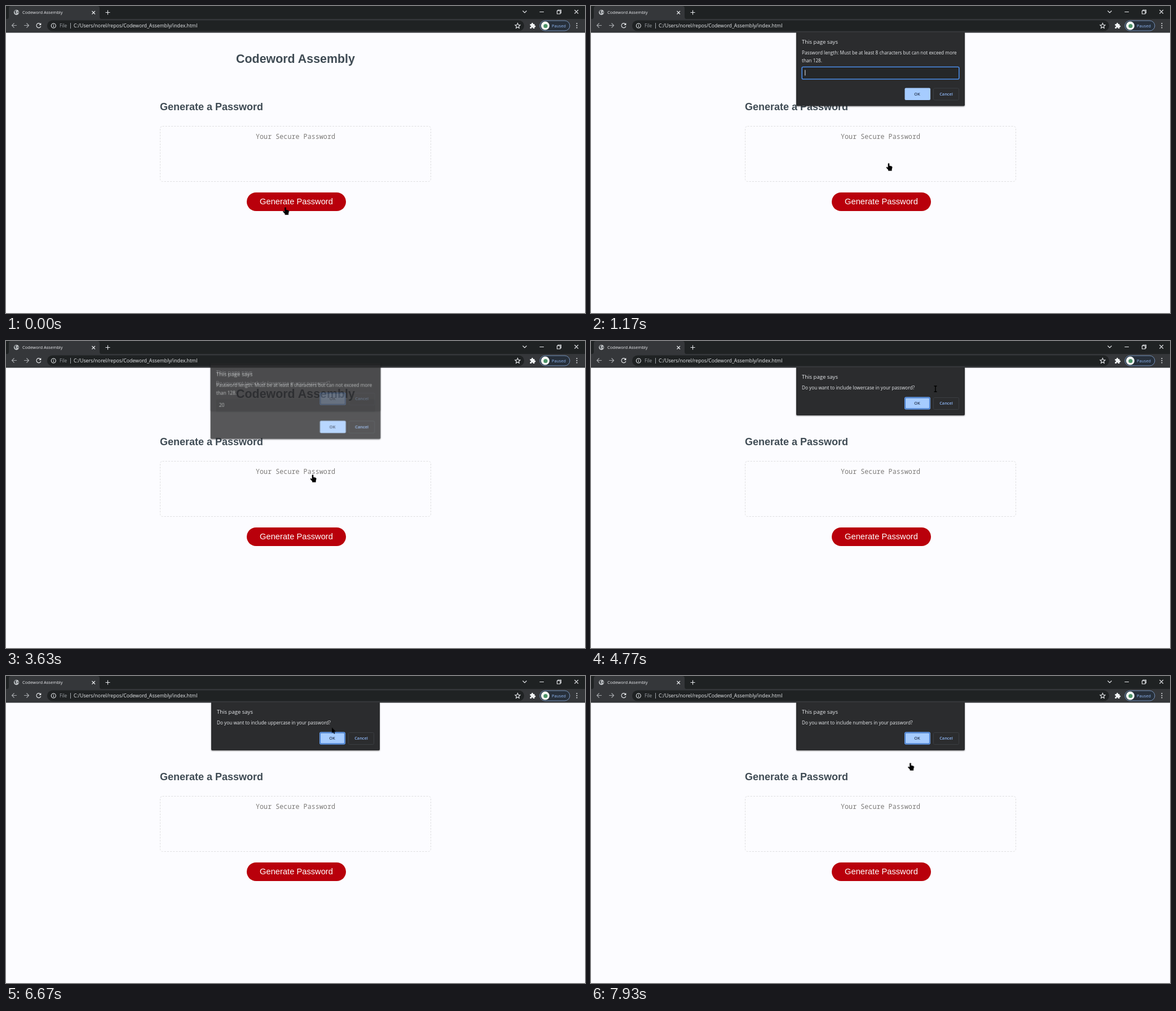
Write an HTML page that moves like this. It is 1027 px wide and 545 px high and loops after 8 s.

```html
<!DOCTYPE html>
<html lang="en">
<head>
<meta charset="utf-8">
<title>Codeword Assembly</title>
<style>
  html, body { margin: 0; width: 100%; height: 100%; overflow: hidden; background: #fcfcff; }
  svg { display: block; width: 100%; height: 100%; }
  text { white-space: pre; }
  .ui { font-family: "Open Sans", "Noto Sans", sans-serif; font-size: 8.22px; fill: #e8eaed; }
  .page { font-family: "Liberation Sans", Arial, sans-serif; font-weight: 700; fill: #3f4b54; }
  .mono { font-family: "Noto Sans Mono", "DejaVu Sans Mono", monospace; font-size: 11.75px; fill: #7d7b79; }
  .mid { text-anchor: middle; }
  .line { fill: none; stroke: #e8eaed; stroke-width: 1.1; }
  .head { font-size: 9.54px; }
  .label { font-size: 7.4px; font-weight: 600; text-anchor: middle; }

  .dialog, .cursor, .cursor g, .caret, .digit, .ring { animation: 8s linear infinite; }
  .dialog { transform-box: fill-box; transform-origin: center; opacity: 0; filter: drop-shadow(0 1px 1px rgba(0,0,0,.45)); }
  .length { animation-name: length; }
  .lower { animation-name: lower; }
  .upper { animation-name: upper; }
  .number { animation-name: number; }

  /* Each dialog drops into place in 250 ms and lifts away in 150 ms. */
  @keyframes length {
    0%, 7.5% { opacity: 0; transform: translateY(-10px) scale(1.012); }
    9% { opacity: 1; }
    9.06% { transform: translateY(-2.6px) scale(1.005); }
    10.625% { transform: none; }
    45% { opacity: 1; transform: none; }
    45.56% { transform: translateY(-6px) scale(1.012); }
    46.875%, 100% { opacity: 0; transform: translateY(-11px) scale(1.02); }
  }
  @keyframes lower {
    0%, 45% { opacity: 0; transform: translateY(-10px) scale(1.012); }
    46.5% { opacity: 1; }
    46.56% { transform: translateY(-2.6px) scale(1.005); }
    48.125% { transform: none; }
    66.25% { opacity: 1; transform: none; }
    66.81% { transform: translateY(-6px) scale(1.012); }
    68.125%, 100% { opacity: 0; transform: translateY(-11px) scale(1.02); }
  }
  @keyframes upper {
    0%, 66.25% { opacity: 0; transform: translateY(-10px) scale(1.012); }
    67.75% { opacity: 1; }
    67.81% { transform: translateY(-2.6px) scale(1.005); }
    69.375% { transform: none; }
    87.5% { opacity: 1; transform: none; }
    88.06% { transform: translateY(-6px) scale(1.012); }
    89.375%, 100% { opacity: 0; transform: translateY(-11px) scale(1.02); }
  }
  @keyframes number {
    0%, 87.5% { opacity: 0; transform: translateY(-10px) scale(1.012); }
    89% { opacity: 1; }
    89.06% { transform: translateY(-2.6px) scale(1.005); }
    90.625%, 100% { opacity: 1; transform: none; }
  }

  .ring { animation-name: ring; animation-timing-function: step-end; }
  @keyframes ring { 0% { opacity: 1; } 45%, 100% { opacity: 0; } }

  .caret { animation-name: caret; animation-timing-function: step-end; }
  @keyframes caret {
    0% { opacity: 1; transform: none; }
    20% { opacity: 0; }
    26.7% { opacity: 1; }
    33.375% { opacity: 0; }
    37.6% { opacity: 1; transform: translateX(4.7px); }
    39.2% { transform: translateX(9.4px); }
    45%, 100% { opacity: 0; transform: translateX(9.4px); }
  }

  .digit { animation-name: first; animation-timing-function: step-end; }
  .digit + .digit { animation-name: second; }
  @keyframes first { 0% { opacity: 0; } 37.6%, 100% { opacity: 1; } }
  @keyframes second { 0% { opacity: 0; } 39.2%, 100% { opacity: 1; } }

  .cursor { animation-name: move; }
  @keyframes move {
    0%, .4% { transform: translate(495.5px, 357px); }
    5.5%, 10.9% { transform: translate(502.5px, 345px); animation-timing-function: ease-in-out; }
    17.5%, 47% { transform: translate(544px, 237px); animation-timing-function: ease-in-out; }
    55%, 55.9% { transform: translate(620px, 120px); }
    59.5%, 61% { transform: translate(611px, 85px); }
    65%, 70.6% { transform: translate(580px, 108px); }
    76.25%, 78.7% { transform: translate(568px, 154px); }
    83.3% { transform: translate(578px, 91px); }
    86.6%, 97.5% { transform: translate(580px, 106px); }
    99.1%, 100% { transform: translate(566.5px, 154px); }
  }

  .cursor g { opacity: 0; animation-timing-function: step-end; }
  .cursor .hand { animation-name: hand; }
  .cursor .beam { animation-name: beam; }
  .cursor .arrow { animation-name: arrow; }
  @keyframes hand {
    0% { opacity: 1; } 54% { opacity: 0; }
    73.5% { opacity: 1; } 80.4% { opacity: 0; }
    98.4%, 100% { opacity: 1; }
  }
  @keyframes beam { 0% { opacity: 0; } 59% { opacity: 1; } 62%, 100% { opacity: 0; } }
  @keyframes arrow {
    0% { opacity: 0; } 54% { opacity: 1; } 59% { opacity: 0; }
    62% { opacity: 1; } 73.5% { opacity: 0; }
    80.4% { opacity: 1; } 98.4%, 100% { opacity: 0; }
  }
</style>
</head>
<body>
<svg viewBox="0 0 1027 545">
  <defs>
    <g id="cancel">
      <rect x="607.5" y="100.5" width="45" height="21" rx="2" fill="none" stroke="#3b3e42"/>
      <text class="ui label" x="630" y="113" style="fill:#8fb8f8">Cancel</text>
    </g>
    <g id="confirm">
      <path d="M364 47H663V130Q663 132 661 132H366Q364 132 364 130Z" fill="#2b2c2e"/>
      <text class="ui head" x="374" y="67">This page says</text>
      <rect x="556" y="99.5" width="46" height="22" rx="2.5" fill="#2d64b4"/>
      <rect x="556.5" y="100" width="45" height="21" rx="2" fill="none" stroke="#7db0fa"/>
      <rect x="558" y="101.5" width="42" height="18" rx="1" fill="#a6ccff"/>
      <text class="ui label" x="578.5" y="113" style="fill:#26344d">OK</text>
      <use href="#cancel"/>
    </g>
  </defs>

  <!-- page -->
  <rect width="1027" height="545" fill="#fcfcff"/>
  <text class="page mid" x="513.5" y="101" font-size="21.4">Codeword Assembly</text>
  <text class="page" x="273" y="185.3" font-size="18">Generate a Password</text>
  <rect x="273.5" y="213.5" width="480" height="98" rx="4" fill="none" stroke="#dedee0" stroke-dasharray="3 2.2"/>
  <text class="mono mid" x="513.5" y="235.6">Your Secure Password</text>
  <rect x="427" y="331" width="176" height="33" rx="16.5" fill="#b9000b"/>
  <text class="page mid" x="515" y="352.3" font-size="14.7" style="font-weight:400;fill:#fff">Generate Password</text>

  <!-- browser frame -->
  <rect width="1027" height="24" fill="#1f2223"/>
  <rect y="23" width="1027" height="24.5" fill="#35373a"/>
  <path d="M1 23.5Q5 23 5 19V4Q5 0 9 0H162Q166 0 166 4V19Q166 23 170 23.5Z" fill="#35373a"/>
  <circle cx="18.5" cy="11.3" r="4.6" fill="#c6c9cc"/>
  <path d="M15 9Q17 7 19 8L17.5 10.5 19 12 17.5 14.5 15.5 12ZM20 10L22.5 9.5 22 13 20.5 13Z" fill="#54585c"/>
  <text class="ui" x="29" y="14" style="font-size:7.55px">Codeword Assembly</text>
  <path class="line" d="M152.5 9L158 14.5M158 9L152.5 14.5M176.5 11.5H184.5M180.5 7.5V15.5"/>
  <path class="line" stroke-width="1" d="M916.5 8.5L920 12 923.5 8.5M946.5 10.5H954M977.5 8.5H983V14H977.5ZM979 8V7H984.5V12.5H983.5M1008.5 7L1015 13.5M1015 7L1008.5 13.5"/>
  <path class="line" style="stroke:#a6a9ad" d="M19 34.5H10.5M14.5 30.5L10.5 34.5 14.5 38.5M32 34.5H40.5M36.500 30.5L40.5 34.5 36.5 38.5"/>
  <path class="line" stroke-width="1.4" d="M61.3 32.3A4 4 0 1 0 61.8 36"/>
  <path d="M62.300 30V34H58.300Z" fill="#e8eaed"/>
  <rect x="73" y="25.500" width="846" height="19" rx="9.500" fill="#1f2223"/>
  <circle class="line" cx="84.300" cy="35" r="4" stroke-width="1"/>
  <path class="line" d="M84.300 34.500V37.300M84.300 32.500V33.500"/>
  <text class="ui" x="95" y="38" style="fill:#a0a5aa">File</text>
  <path d="M114.500 30V40" stroke="#a0a5aa"/>
  <text class="ui" x="120" y="38" style="font-size:8.75px">C:/Users/norel/repos/Codeword_Assembly/index.html</text>
  <path class="line" stroke-width="1" d="M907.500 30.500L908.800 33.600 912 33.900 909.600 36 910.300 39.300 907.500 37.500 904.700 39.300 905.400 36 903 33.900 906.200 33.600Z"/>
  <path d="M929.500 32H932Q932 29.800 933.500 29.800 935 29.800 935 32H937.500V34.500Q939.500 34.500 939.500 36 939.500 37.500 937.500 37.500V40H934.800Q934.800 38 933.400 38 932 38 932 40H929.500V37.200Q931.300 37.200 931.300 36 931.300 34.700 929.500 34.700Z" fill="#f1f3f4"/>
  <rect x="947" y="26" width="53" height="18" rx="9" fill="#27303b" stroke="#7592ba"/>
  <circle cx="956.500" cy="35" r="7.500" fill="#f4f8f5"/>
  <circle cx="957" cy="35.500" r="3.600" fill="#4c9468"/>
  <text class="ui" x="968" y="37.500" style="font-size:7.3px;fill:#8fb6f2">Paused</text>
  <g fill="#e8eaed"><circle cx="1012.500" cy="31" r="1"/><circle cx="1012.500" cy="34.700" r="1"/><circle cx="1012.500" cy="38.400" r="1"/></g>

  <!-- prompts -->
  <g class="dialog length">
    <path d="M364 47H663V175.500Q663 177.500 661 177.500H366Q364 177.500 364 175.500Z" fill="#2b2c2e"/>
    <text class="ui head" x="374" y="67">This page says</text>
    <text class="ui" x="374" y="86">Password length: Must be at least 8 characters but can not exceed more</text>
    <text class="ui" x="374" y="99.500">than 128.</text>
    <rect x="374" y="108" width="279" height="22" rx="2" fill="#252729"/>
    <rect class="ring" x="374.200" y="108.200" width="278.600" height="21.600" rx="2" fill="none" stroke="#4a8be6" stroke-width="1.600"/>
    <text class="ui digit" x="379" y="121.300">2</text>
    <text class="ui digit" x="383.700" y="121.300">0</text>
    <rect class="caret" x="379.300" y="113.500" width="1" height="10" fill="#e8eaed"/>
    <rect x="556.500" y="145.500" width="45.500" height="21.500" rx="2" fill="#a6ccff"/>
    <text class="ui label" x="578.500" y="158.700" style="fill:#26344d">OK</text>
    <use href="#cancel" y="45.500"/>
  </g>
  <g class="dialog lower">
    <use href="#confirm"/>
    <text class="ui" x="374" y="86">Do you want to include lowercase in your password?</text>
  </g>
  <g class="dialog upper">
    <use href="#confirm"/>
    <text class="ui" x="374" y="86">Do you want to include uppercase in your password?</text>
  </g>
  <g class="dialog number">
    <use href="#confirm"/>
    <text class="ui" x="374" y="86">Do you want to include numbers in your password?</text>
  </g>

  <g class="cursor">
    <g class="hand"><path d="M-1.300 1Q0 -.7 1.300 1V4.800L4.800 5.500Q6.800 6 6.500 8L5.600 11V13.700H-.8V12L-4 8.600Q-4.700 7.200 -3.200 6.800L-1.300 8Z"/></g>
    <g class="beam"><path d="M-2.500 -5H2.500M0 -5V5M-2.500 5H2.500" fill="none" stroke="#000" stroke-width="1.500"/></g>
    <g class="arrow"><path d="M0 0V10L2.300 8 3.900 11.500 5.400 10.800 3.900 7.500H7Z"/></g>
  </g>
</svg>
</body>
</html>
```
